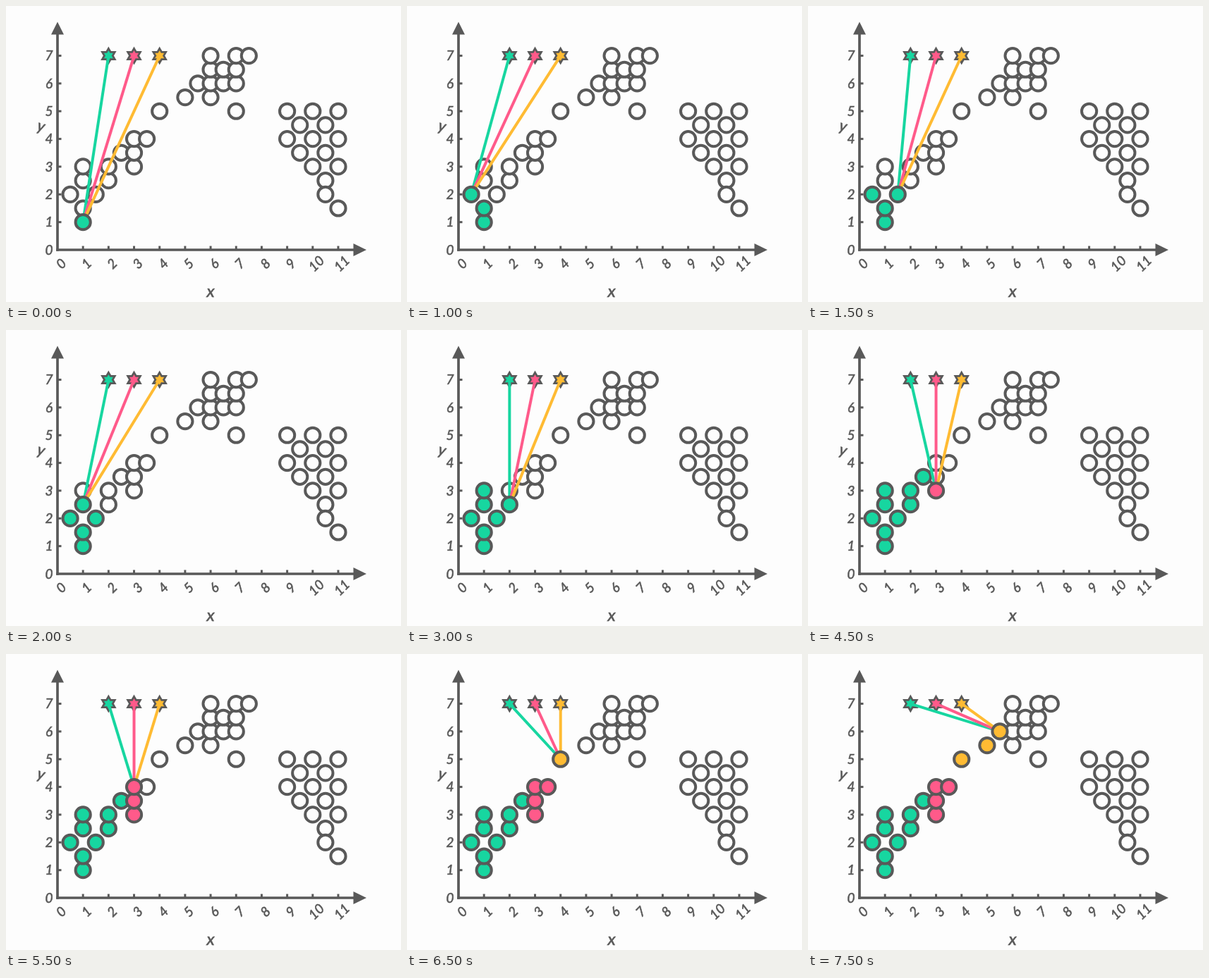
Animation, 560 px wide and 420 px high, one loop 8 s. Source, as an HTML page with a canvas:

```html
<!DOCTYPE html>
<html lang="en">
<head>
<meta charset="utf-8">
<title>Nearest centroid</title>
<style>
  html, body { margin: 0; width: 560px; height: 420px; overflow: hidden; background: #fdfdfd; }
  canvas { display: block; }
</style>
</head>
<body>
<canvas id="stage" width="560" height="420"></canvas>
<script>
const ctx = document.getElementById('stage').getContext('2d');
const INK = '#595959', PAPER = '#fdfdfd', TAU = Math.PI * 2;
const STEP = 500, LOOP = 8000;

const px = x => 73 + 36.18 * x;
const py = y => 346 - 39.35 * y;

const centroids = ['#17d6a0', '#ff5a8a', '#ffbb33']
  .map((color, i) => ({ x: 2 + i, y: 7, color }));

// A row of n evenly spaced points, upwards by half a unit unless told otherwise
const run = (x, y, n = 1, dx = 0, dy = .5) =>
  Array.from({ length: n }, (_, i) => ({ x: x + i * dx, y: y + i * dy }));

// Points in the order in which they are visited
const visited = [
  run(1, 1, 2), run(.5, 2, 2, 1, 0), run(1, 2.5, 2), run(2, 2.5, 2),
  run(2.5, 3.5), run(3, 3, 3), run(3.5, 4), run(4, 5), run(5, 5.5, 2, .5)
].flat();

const cluster = [run(6, 5.5, 4), run(6.5, 6, 2), run(7, 5), run(7, 6, 3), run(7.5, 7)].flat();

// Staggered columns hanging from the top, with a short tail below
const wedge = run(9, 5, 5, .5, 0)
  .flatMap(({ x, y }, i) => run(x, y - i % 2 / 2, i < 2 ? 2 : 3, 0, -1))
  .concat(run(10.5, 2, 2, .5, -.5));

const waiting = [...cluster, ...wedge];

function nearestColor(p) {
  const distance = c => Math.hypot(c.x - p.x, c.y - p.y);
  return centroids.reduce((best, c) => distance(c) < distance(best) ? c : best).color;
}

function line(x1, y1, x2, y2, color, width) {
  ctx.strokeStyle = color;
  ctx.lineWidth = width;
  ctx.beginPath();
  ctx.moveTo(x1, y1);
  ctx.lineTo(x2, y2);
  ctx.stroke();
}

function polygon(points, fill) {
  ctx.beginPath();
  points.forEach(p => ctx.lineTo(...p));
  ctx.closePath();
  ctx.fillStyle = fill;
  ctx.fill();
}

function label(text, x, y, size, angle = 0) {
  ctx.save();
  ctx.translate(x, y);
  ctx.rotate(angle);
  ctx.font = `italic ${size}px Lato, sans-serif`;
  ctx.fillStyle = ctx.strokeStyle = INK;
  ctx.lineWidth = .6;
  ctx.textAlign = 'center';
  ctx.fillText(text, 0, size * .36);
  ctx.strokeText(text, 0, size * .36);
  ctx.restore();
}

function drawAxes() {
  line(73, 347.8, 73, 38, INK, 3.7);
  line(71.2, 346, 495, 346, INK, 3.7);
  polygon([[73, 22.5], [82, 40.5], [64, 40.5]], INK);
  polygon([[511, 346], [492.5, 337], [492.5, 355]], INK);
  for (let y = 0; y <= 7; y++) {
    if (y) line(73, py(y), 78.5, py(y), INK, 3);
    label(y, 61, py(y), 19);
  }
  for (let x = 0; x <= 11; x++) {
    if (x) line(px(x), 340.5, px(x), 346, INK, 3);
    label(x, px(x) + 5, 365.5, 19, -Math.PI / 4);
  }
  label('x', 290, 404, 24);
  label('y', 50, 170, 22, .25);
}

function drawStar({ x, y, color }) {
  const points = Array.from({ length: 12 }, (_, i) => {
    const r = i % 2 ? 5.9 : 10.2, a = i * TAU / 12 - TAU / 4;
    return [px(x) + r * Math.cos(a), py(y) + r * Math.sin(a)];
  });
  polygon(points, color);
  ctx.strokeStyle = INK;
  ctx.lineWidth = 2.8;
  ctx.stroke();
}

function drawDot({ x, y }, fill) {
  ctx.beginPath();
  ctx.arc(px(x), py(y), 10.6, 0, TAU);
  ctx.fillStyle = fill;
  ctx.fill();
  ctx.strokeStyle = INK;
  ctx.lineWidth = 4;
  ctx.stroke();
}

function frame(now) {
  const current = Math.floor(now % LOOP / STEP);
  const target = visited[current];

  ctx.fillStyle = PAPER;
  ctx.fillRect(0, 0, 560, 420);
  drawAxes();
  visited.slice(current + 1).concat(waiting).forEach(p => drawDot(p, PAPER));
  visited.slice(0, current).forEach(p => drawDot(p, nearestColor(p)));
  centroids.forEach(drawStar);
  for (const { x, y, color } of centroids) {
    line(px(x), py(y), px(target.x), py(target.y), color, 4);
  }
  drawDot(target, nearestColor(target));
}

const start = performance.now();
function tick() {
  frame(performance.now() - start);
  requestAnimationFrame(tick);
}
tick();
</script>
</body>
</html>
```
